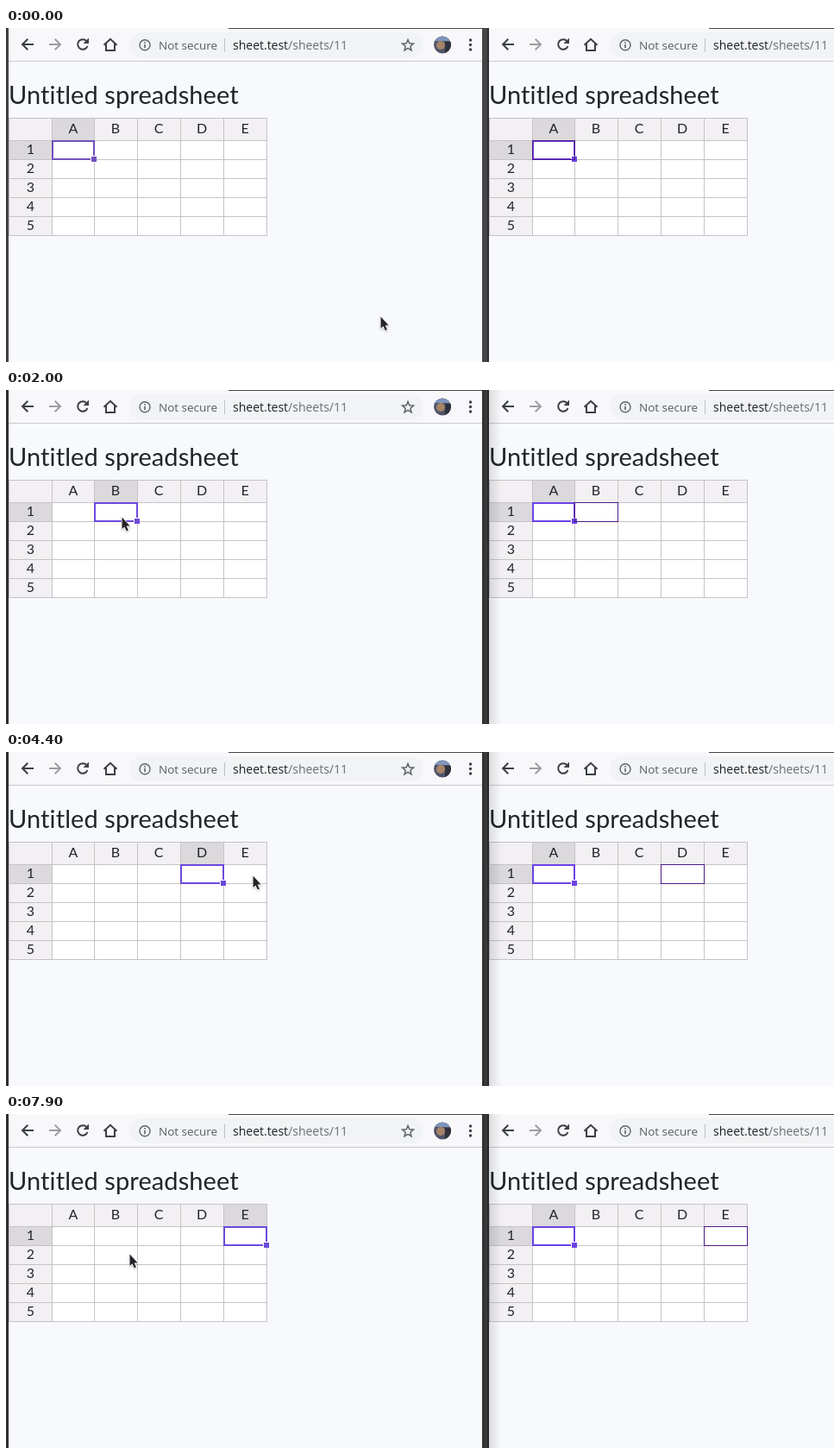
Write an HTML page with a canvas that moves like this. It is 960 px wide and 387 px high and loops after 8 s.

```html
<!DOCTYPE html>
<html lang="en">
<head>
<meta charset="utf-8">
<title>Shared spreadsheet</title>
<style>
  html, body { margin: 0; width: 100%; height: 100%; overflow: hidden; }
  canvas { display: block; }
</style>
</head>
<body>
<canvas id="stage" width="960" height="387"></canvas>
<script>
const ctx = document.getElementById('stage').getContext('2d');
const LOOP = 8000;
const STEP = 100;
const RIGHT_X = 557;
const FOCUS_TIME = 1800;
const INK = '#212529';
const ICON = '#3c4043';
const FRAME_DARK = '#302e30';
const FRAME_LIGHT = '#474547';

const columnX = i => Math.round(2.7 + 49.85 * i);
const rowY = i => i ? 108 + 22 * i : 104;

const selections = [
  { at: 0, column: 1 }, { at: 2000, column: 2 },
  { at: 3300, column: 4 }, { at: 5000, column: 5 }
];

// Each sweep eases the pointer to a point; bow bends its path downwards.
const pointerStart = { x: 434, y: 334 };
const sweeps = [
  { from: 300, to: 900, x: 148, y: 169, bow: 0 },
  { from: 1000, to: 1300, x: 134, y: 147, bow: 0 },
  { from: 2300, to: 2800, x: 244, y: 139, bow: 13 },
  { from: 3000, to: 3100, x: 231, y: 138, bow: 0 },
  { from: 3700, to: 4400, x: 286, y: 143, bow: 14 },
  { from: 5300, to: 5400, x: 283, y: 158, bow: 0 },
  { from: 5500, to: 6400, x: 87, y: 143, bow: 50 },
  { from: 7800, to: 7900, x: 143, y: 162, bow: 0 }
];

function pointerAt(time) {
  const now = Math.floor(time / STEP) * STEP;
  let { x, y } = pointerStart;
  for (const sweep of sweeps) {
    const t = Math.min(1, Math.max(0, (now - sweep.from) / (sweep.to - sweep.from)));
    const eased = 1 - (1 - t) ** 1.5;
    x += (sweep.x - x) * eased;
    y += (sweep.y - y) * eased + sweep.bow * 4 * eased * (1 - eased);
  }
  return { x: Math.round(x), y: Math.round(y) };
}

function rect(x, y, w, h, color) {
  ctx.fillStyle = color;
  ctx.fillRect(x, y, w, h);
}

function disc(x, y, r, color) {
  ctx.fillStyle = color;
  ctx.beginPath();
  ctx.arc(x, y, r, 0, Math.PI * 2);
  ctx.fill();
}

function text(label, x, y, font, color, align = 'left') {
  ctx.font = font;
  ctx.fillStyle = color;
  ctx.textAlign = align;
  ctx.fillText(label, x, y);
}

function line(path, color, width) {
  ctx.strokeStyle = color;
  ctx.lineWidth = width;
  ctx.stroke(new Path2D(path));
}

function drawArrow(x, direction, color) {
  ctx.save();
  ctx.translate(x, 19);
  ctx.scale(direction, 1);
  line('M7 0H-6M0.3 -6.3L-6 0L0.3 6.3', color, 2);
  ctx.restore();
}

function drawReload() {
  ctx.strokeStyle = ICON;
  ctx.lineWidth = 2;
  ctx.beginPath();
  ctx.arc(89, 19, 5.8, 0.35, Math.PI * 1.75);
  ctx.stroke();
  ctx.fillStyle = ICON;
  ctx.fill(new Path2D('M96 11.5V18H89.5Z'));
}

function drawStar() {
  ctx.beginPath();
  for (let i = 0; i < 10; i++) {
    const angle = i * Math.PI / 5 - Math.PI / 2;
    const r = i % 2 ? 3 : 6.8;
    ctx.lineTo(466 + r * Math.cos(angle), 20.3 + r * Math.sin(angle));
  }
  ctx.closePath();
  ctx.strokeStyle = '#5f6368';
  ctx.lineWidth = 1.5;
  ctx.stroke();
}

function drawAvatar() {
  ctx.save();
  ctx.beginPath();
  ctx.arc(506, 19.5, 10, 0, Math.PI * 2);
  ctx.clip();
  rect(496, 9, 20, 21, '#51556a');
  rect(496, 9, 20, 6, '#7e94b9');
  disc(504, 20, 5, '#a58468');
  rect(509, 16, 7, 13, '#30313d');
  ctx.restore();
}

function drawAddress() {
  ctx.fillStyle = '#f1f3f4';
  ctx.beginPath();
  ctx.roundRect(143, 5, 341, 29, 14.5);
  ctx.fill();
  ctx.strokeStyle = '#5f6368';
  ctx.lineWidth = 1.4;
  ctx.beginPath();
  ctx.arc(161, 19.8, 6, 0, Math.PI * 2);
  ctx.stroke();
  rect(160.2, 18.8, 1.6, 4.4, '#5f6368');
  rect(160.2, 16, 1.6, 1.6, '#5f6368');

  const font = '14px "Open Sans", sans-serif';
  text('Not secure', 177, 24.5, '13.5px "Open Sans", sans-serif', '#585c60');
  rect(253, 12, 1, 16, '#bfc2c5');
  text('sheet.test', 263, 24.5, font, '#1f2225');
  text('/sheets/11', 263 + ctx.measureText('sheet.test').width, 24.5, font, '#6b6f74');
}

function drawToolbar() {
  rect(3, 0, 960, 38, '#f8f8fa');
  rect(258, 0, 700, 1, FRAME_LIGHT);
  rect(3, 38, 960, 1, '#c8cacc');
  drawArrow(25, 1, ICON);
  drawArrow(57, -1, '#9c9ea1');
  drawReload();
  line('M113.5 19.8L121 12.8L128.5 19.8M116 18V26H126V18', ICON, 2);
  drawAddress();
  drawStar();
  drawAvatar();
  for (let i = -1; i <= 1; i++) disc(538.5, 19.5 + 5.5 * i, 1.7, ICON);
}

function drawTable(selected) {
  rect(3, 104, 300, 137, '#ffffff');
  rect(3, 104, 300, 26, '#f2f0f2');
  rect(3, 130, 50, 111, '#f2f0f2');
  rect(columnX(selected), 104, 50, 26, '#dbd9dc');
  rect(3, 130, 50, 22, '#dbd9dc');
  for (let i = 0; i <= 6; i++) {
    rect(columnX(i), 104, 1, 137, '#c5c3c7');
    rect(3, rowY(i), 300, 1, '#c5c3c7');
  }
  const font = '16px Lato, sans-serif';
  for (let i = 1; i <= 5; i++) {
    text('ABCDE'[i - 1], columnX(i) + 25, 122, font, INK, 'center');
    text(i, 28.5, rowY(i) + 16, font, INK, 'center');
  }
}

function outline(column, width, color) {
  const x = columnX(column);
  const w = columnX(column + 1) + 1 - x;
  ctx.strokeStyle = color;
  ctx.lineWidth = width;
  ctx.strokeRect(x + width / 2, 130 + width / 2, w - width, 23 - width);
}

function drawSelection(column, color) {
  outline(column, 2, color);
  const x = columnX(column + 1);
  rect(x - 4, 148, 7, 7, '#ffffff');
  rect(x - 3, 149, 6, 6, color);
}

function drawTitle() {
  ctx.save();
  ctx.letterSpacing = '0.1px'; // also keeps "ti" from joining
  text('Untitled spreadsheet', 3, 88, '29px Lato, sans-serif', INK);
  ctx.restore();
}

function drawPage(offset, selected, color, remote) {
  ctx.save();
  ctx.translate(offset, 0);
  ctx.beginPath();
  ctx.rect(3, 0, offset ? 400 : 549, 387);
  ctx.clip();
  rect(3, 0, 549, 387, '#f7f9fd');
  drawToolbar();
  drawTitle();
  drawTable(selected);
  drawSelection(selected, color);
  if (remote) outline(remote, 1, '#4e1a86');
  ctx.restore();
}

function drawFrames(leftFocused) {
  const edge = leftFocused ? FRAME_DARK : FRAME_LIGHT;
  rect(0, 0, 1, 387, FRAME_DARK);
  rect(1, 0, 2, 387, edge);
  rect(552, 0, 8, 387, FRAME_LIGHT);
  rect(552, 0, 2, 387, edge);
  rect(558, 0, 2, 387, FRAME_DARK);
  if (leftFocused) {
    const shade = ctx.createLinearGradient(552, 0, 575, 0);
    shade.addColorStop(0, 'rgba(0,0,0,.24)');
    shade.addColorStop(0.4, 'rgba(0,0,0,.1)');
    shade.addColorStop(1, 'rgba(0,0,0,0)');
    rect(554, 0, 21, 387, shade);
  }
}

function drawPointer({ x, y }) {
  ctx.save();
  ctx.translate(x, y);
  const arrow = new Path2D('M0.5 0.5V14L3.4 11.4L5.8 16.5L7.9 15.6L5.6 10.6H9.6Z');
  ctx.shadowColor = 'rgba(0,0,0,.25)';
  ctx.shadowBlur = 2;
  ctx.shadowOffsetY = 1;
  ctx.strokeStyle = '#ffffff';
  ctx.lineWidth = 1.6;
  ctx.stroke(arrow);
  ctx.shadowColor = 'transparent';
  ctx.fillStyle = '#252327';
  ctx.fill(arrow);
  ctx.restore();
}

function draw(now) {
  const time = now % LOOP;
  const selected = selections.findLast(choice => choice.at <= time).column;
  drawPage(0, selected, selected === 1 ? '#7350bd' : '#6c49dc', 0);
  drawPage(RIGHT_X, 1, '#6c42e6', selected);
  drawFrames(time >= FOCUS_TIME);
  drawPointer(pointerAt(time));
}

const start = performance.now();
function tick() {
  draw(performance.now() - start);
  requestAnimationFrame(tick);
}
tick();
</script>
</body>
</html>
```
